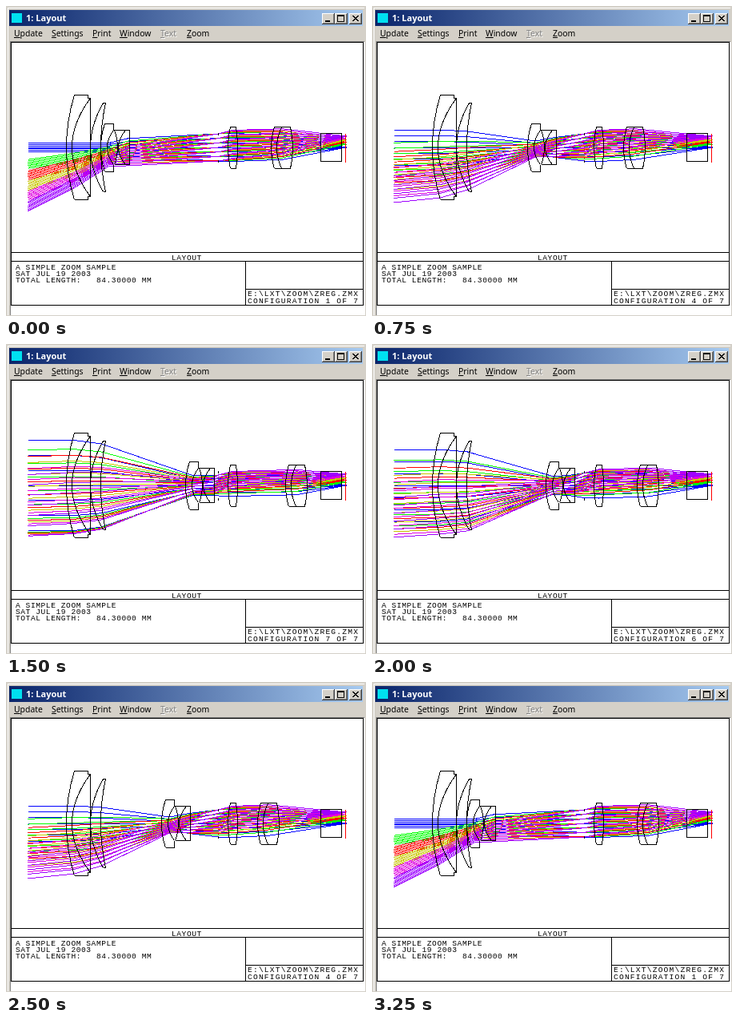
These frames come from a looping animation (450x388 px, 3.5 s). An HTML page:

```html
<!DOCTYPE html>
<html lang="en">
<head>
<meta charset="utf-8">
<title>Layout</title>
<style>
html, body { margin: 0; width: 100%; height: 100%; overflow: hidden; background: #d4d0c8; }
svg { display: block; }
.line { fill: none; stroke: #000; shape-rendering: crispEdges; }
.plot text { font: 9.6px "Liberation Mono", monospace; letter-spacing: .55px; white-space: pre; }
.plot .wide { letter-spacing: 1.2px; }
.menu { font: 10.4px "Noto Sans", sans-serif; }
.title { font: bold 11px "Noto Sans", sans-serif; fill: #fff; }
.key { text-decoration: underline; }
</style>
</head>
<body>
<svg width="450" height="388" viewBox="0 0 450 388">
  <defs>
    <linearGradient id="bar"><stop stop-color="#0a246a"/><stop offset="1" stop-color="#a6caf0"/></linearGradient>
  </defs>
  <g id="window">
    <g shape-rendering="crispEdges">
      <path fill="#d4d0c8" d="M0 0h450v390H0z"/>
      <path fill="#fff" d="M2 2h446v1H3v384H2zM6 45h443v342H6z"/>
      <path fill="#808080" d="M5 44h443v1H6v342H5z"/>
      <path fill="url(#bar)" d="M4 5h442v20H4z"/>
      <path fill="#00e0f0" d="M7 9h13v12H7z"/>
    </g>
    <g id="buttons" shape-rendering="crispEdges"></g>
    <text class="title" x="25" y="19">1: Layout</text>
    <g id="menu" class="menu"></g>
    <path class="line" transform="translate(.5 .5)" d="M6 45H446V374H6zM6 308H446M6 319H446M299 319V374M299 354H446"/>
    <g class="plot">
      <text x="207" y="318">LAYOUT</text>
      <text x="12" y="330">A SIMPLE ZOOM SAMPLE</text>
      <text x="12" y="338">SAT JUL 19 2003</text>
      <text x="12" y="346">TOTAL LENGTH:   84.30000 MM</text>
      <text class="wide" x="302" y="363">E:\LXT\ZOOM\ZREG.ZMX</text>
      <text class="wide" x="302" y="372" id="label"></text>
    </g>
    <g id="optics" class="line" transform="translate(.5 .5)"></g>
  </g>
</svg>
<script>
const $ = id => document.getElementById(id);
const AXIS = 176.5;
const FIELDS = [[0, '#00f'], [.28, '#0f0'], [.47, '#f00'], [.65, '#c8c800'], [.82, '#e000e0'], [1, '#a000ff']];
const RAYS = 7;

// x of the second and fourth groups, beam radius, vignetting,
// chief-ray heights at the entrance and first two lenses,
// beam radius at lens two, beam radius and chief height at group two,
// beam radius at the stop, vertical nudge
const ZOOMS = [
  [122, 335, 5.5, 0, 74, 45, 24, 5.5, 5.5, 18, 17, 0],
  [154, 326, 9.5, 0, 69, 48, 30, 9, 6, 12, 17, -1],
  [180, 320, 15, .1, 62, 50, 33, 14, 7, 8, 17, -1],
  [198, 318, 22, .5, 58, 52, 43, 20, 8, 8, 17, 0],
  [211, 321, 31, .61, 53, 49, 41, 28, 10, 8, 17, -1],
  [221, 335, 45, .67, 50, 46, 43, 42, 11, 6, 15.5, 0],
  [228, 353, 56.5, .64, 43, 40, 36, 52, 12, 5, 13, 0]
];

// Curved surface with a sag at mid-height
const surface = (x, top, bottom, sag) =>
  `M${x} ${top}Q${x + 2 * sag} ${(top + bottom) / 2} ${x} ${bottom}`;
const lens = (left, right, top, bottom, sagL, sagR) =>
  surface(left, top, bottom, sagL) + surface(right, top, bottom, sagR) +
  `M${left} ${top}H${right}M${left} ${bottom}H${right}`;

function lenses(x2, x4) {
  return surface(85, 111, 242, -10) + surface(105, 115, 238, -23) +
    'M85 111H102V115H105V238H102V242H85' +
    lens(121, 124, 121, 232, -16, -6) +
    surface(x2 + 1, 147, 207, -5) + surface(x2 + 12, 155, 198, -8) +
    `M${x2 + 1} 147h11v8M${x2 + 1} 207h11v-9` +
    lens(x2 + 13, x2 + 32, 155, 198, 4, 0) + surface(x2 + 27, 155, 198, -9) +
    'M265 158V161M265 192V195' +
    lens(280, 287, 151, 203, -3, 2) +
    lens(x4, x4 + 20, 151, 203, -4, 3) + surface(x4 + 9, 151, 203, -6) +
    'M393 159H419V194H393z';
}

function ray(f, p, [x2, x4, r, , a, b, c, rc, rg, g, stop]) {
  const points = [
    [27, r, a], [85, r, b], [119, rc, c],
    [x2 + 6, rg, g], [x2 + 30, (rg + stop) / 2, g * .65],
    [265, stop, 0], [283, stop + .5, -4],
    [x4 + 10, stop * .9, -8], [425, 0, -14]
  ];
  return points.map(([x, radius, chief]) => `${x},${AXIS + p * radius + f * chief}`).join(' ');
}

function optics(zoom) {
  const [x2, x4, , cut] = zoom;
  let out = '';
  for (const [f, color] of FIELDS)
    for (let i = 0; i < RAYS; i++) {
      const p = -1 + (2 - f * cut) * i / (RAYS - 1);
      out += `<polyline stroke="${color}" points="${ray(f, p, zoom)}"/>`;
    }
  return out + `<path d="${lenses(x2, x4)}"/><path stroke="#f00" d="M424 159V195"/>`;
}

function button(x, icon) {
  return `<path fill="#404040" d="M${x} 9h16v14h-16z"/><path fill="#fff" d="M${x} 9h15v13h-15z"/>` +
    `<path fill="#808080" d="M${x + 1} 10h14v12h-14z"/><path fill="#d4d0c8" d="M${x + 1} 10h13v11h-13z"/>` +
    `<path fill="none" stroke="#000" transform="translate(${x} 9)" d="${icon}"/>`;
}

$('buttons').innerHTML =
  button(395, 'M4 10h6M4 9h6') +
  button(411, 'M3.5 2.5h8v8h-8zM3 3.5h9') +
  button(429, 'M4 3l7 7M5 3l7 7M11 3l-7 7M12 3l-7 7');

const word = (text, x, y, fill) =>
  `<text x="${x}" y="${y}" fill="${fill}"><tspan class="key">${text[0]}</tspan>${text.slice(1)}</text>`;
$('menu').innerHTML = word('Text', 194, 39, '#fff') +
  [['Update', 10], ['Settings', 57], ['Print', 108], ['Window', 142], ['Text', 193], ['Zoom', 226]]
    .map(([t, x]) => word(t, x, 38, t === 'Text' ? '#808080' : '#000')).join('');

const scenes = ZOOMS.map(optics);
let shown = -1;

function draw(now) {
  const step = Math.floor(now % 3500 / 250);
  const n = Math.min(step, 13 - step);
  if (n !== shown) {
    shown = n;
    $('optics').innerHTML = scenes[n];
    $('label').textContent = `CONFIGURATION ${n + 1} OF 7`;
    $('window').setAttribute('transform', `translate(0 ${ZOOMS[n].at(-1)})`);
  }
}

const start = performance.now();
function tick() {
  draw(performance.now() - start);
  requestAnimationFrame(tick);
}
tick();
</script>
</body>
</html>
```
